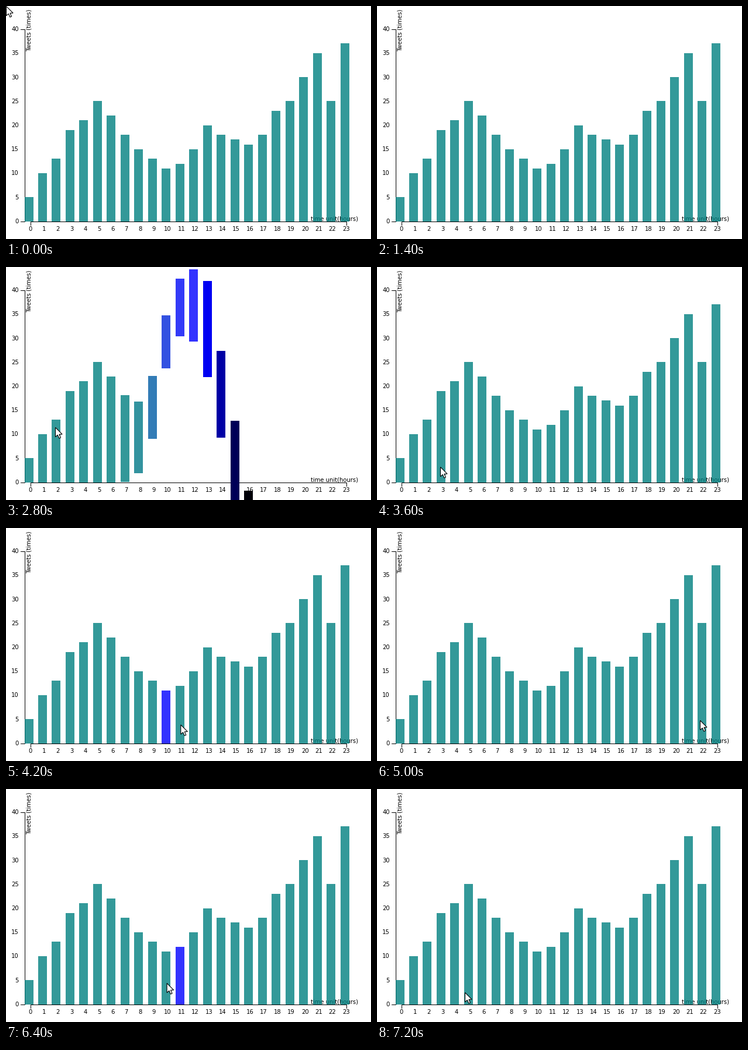
Recreate the animation shown at these times as a matplotlib script. Size 624 px wide and 400 px high, loop 7400 ms.

```python
import numpy as np
import matplotlib.pyplot as plt
from matplotlib.animation import FuncAnimation
from matplotlib.patches import Polygon, Rectangle

W, H, DPI = 624, 400, 100
STEP, LOOP = 200, 7400
PX = 72 / DPI

VALUES = [5, 10, 13, 19, 21, 25, 22, 18, 15, 13, 11, 12,
          15, 20, 18, 17, 16, 18, 23, 25, 30, 35, 25, 37]
UNIT, BASE = 8.25, 369.5
PITCH, BAR_X, BAR_W = 540 / 23, 31.5, 15
TEAL, BLUE = np.array([0, .5, .5]), np.array([0, 0, 1.])

# Timing of the entry: each bar starts STAGGER ms after the one before it
RELOAD, AXES_AT, HOVER_FROM = 1600, 2000, 3600
ENTRY, STAGGER = 2154.7, 40
TOP, SPEED = 3.3, 120
RISE, WAIT, FALL = (H - TOP) / SPEED, 3.633, 6

# Pointer path: time, x, y
PATH = np.array([
    (2200, 46, 62), (2400, 61, 175), (2800, 84, 275), (3400, 108, 343),
    (3600, 108, 343), (5000, 552, 330), (5800, 368, 321), (7200, 150, 349)])
ARROW = np.array([(0, 0), (0, 16.2), (3.8, 12.8), (6.3, 18.6),
                  (9, 17.5), (6.5, 11.8), (11.6, 11.6)])

fig = plt.figure(figsize=(W / DPI, H / DPI), dpi=DPI, facecolor="white")
ax = fig.add_axes([0, 0, 1, 1])
ax.set(xlim=(0, W), ylim=(H, 0))
ax.axis("off")


def label(x, y, text, **kw):
    kw = {"ha": "left", "va": "baseline", **kw}
    return ax.text(x, y, text, fontsize=10 * PX, family="DejaVu Sans",
                   color="black", zorder=2, **kw)


def line(xs, ys):
    return ax.plot(xs, ys, color="black", lw=PX, zorder=1,
                   solid_joinstyle="miter")[0]


frame = [
    line([25, 31.5, 31.5, 25], [39.5, 39.5, 369.5, 369.5]),
    line([41.5, 41.5, 581.5, 581.5], [375.5, 369.5, 369.5, 375.5]),
    label(521, 369, "time unit(hours)"),
    label(45, 78, "Tweets (times)", rotation=90, ha="right", va="bottom"),
]
frame += [label(22, BASE - UNIT * v + 3.5, str(v), ha="right")
          for v in range(0, 41, 5)]
frame += [label(41.5 + PITCH * i, 385.5, str(i), ha="center")
          for i in range(24)]

bars = [ax.add_patch(Rectangle((BAR_X + PITCH * i, H), BAR_W, UNIT * v,
                               lw=0, zorder=3))
        for i, v in enumerate(VALUES)]
pointer = ax.add_patch(Polygon(ARROW, closed=True, fc="white", ec="black",
                               lw=1.1 * PX, zorder=5))


def cubic_in_out(q):
    q = min(max(q, 0), 1)
    return 4 * q ** 3 if q < .5 else 1 - 4 * (1 - q) ** 3


def bar_state(i, t):
    """Top edge, colour and opacity of bar i."""
    rest = BASE - UNIT * VALUES[i]
    if t < RELOAD:
        return rest, TEAL, .8
    age = (t - ENTRY) / STAGGER + .0005 - i
    if age < WAIT:
        p = min(max(age / RISE, 0), 1)
        return H + (TOP - H) * p, BLUE * p, 1
    e = cubic_in_out((age - WAIT) / FALL)
    return TOP + (rest - TOP) * e, BLUE + (TEAL - BLUE) * e, .8


def pointer_at(t):
    return np.array([np.interp(t, PATH[:, 0], PATH[:, k]) for k in (1, 2)])


def bar_under(t):
    i, off = divmod(pointer_at(t)[0] - BAR_X, PITCH)
    return int(i) if off < BAR_W else None


def lit_bar(t):
    """The bar the pointer has just left."""
    if t < HOVER_FROM:
        return None
    left = bar_under(t - 100)
    return left if left != bar_under(t) else None


def draw(n):
    t = n * STEP
    shown = not RELOAD <= t < AXES_AT
    for artist in frame:
        artist.set_visible(shown)
    lit = lit_bar(t)
    for i, bar in enumerate(bars):
        top, color, alpha = bar_state(i, t)
        bar.set_y(top)
        bar.set_facecolor((*(BLUE if i == lit else color), alpha))
        bar.set_visible(shown and top < H)
    pointer.set_visible(t == 0 or t >= PATH[0, 0])
    pointer.set_xy(ARROW + (pointer_at(t) if t else 0) + .5)
    return [*frame, *bars, pointer]


anim = FuncAnimation(fig, draw, frames=LOOP // STEP, interval=STEP,
                     repeat=True, repeat_delay=0, blit=False)
plt.show()
```
